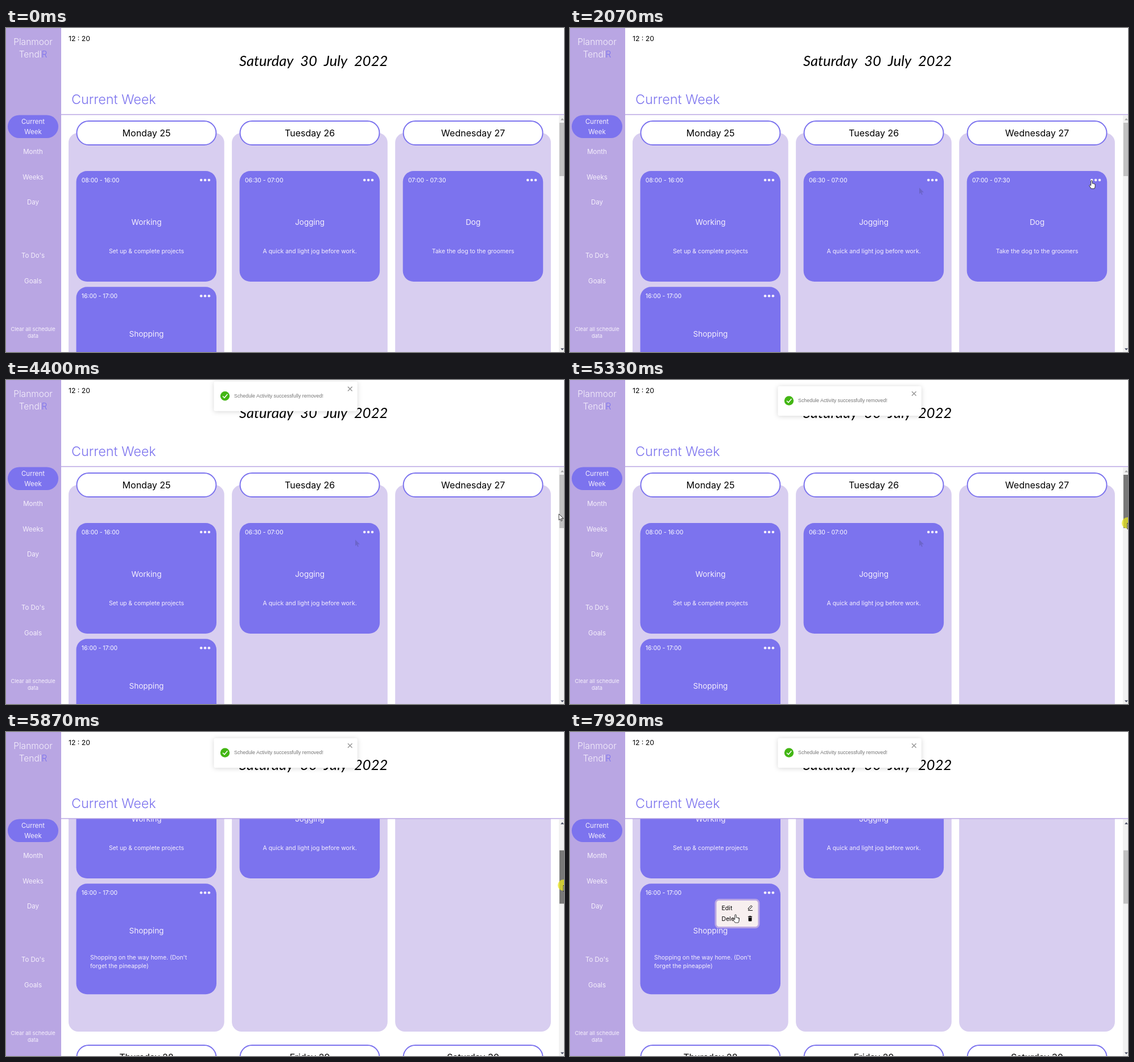
Write an HTML page that moves like this. It is 981x571 px and loops after 7.99 s.

```html
<!DOCTYPE html>
<html lang="en">
<head>
<meta charset="utf-8">
<title>Week schedule</title>
<style>
  html, body { margin: 0; width: 100%; height: 100%; overflow: hidden; background: #fff; }
  svg { display: block; width: 981px; height: 571px; font-family: Inter, "Open Sans", sans-serif; }
  .box { filter: drop-shadow(0 1px 4px rgba(0, 0, 0, .16)); }
</style>
</head>
<body>
<svg id="stage" viewBox="0 0 981 571"></svg>
<script>
const LOOP = 7990, STEP = 66.6;
const VIOLET = '#7c73ee', LILAC = '#b9a6e3', PALE = '#d8cef0', SOFT = '#f6f0fc';
const LEFT = 'text-anchor="start"', MID = 'text-anchor="middle"', LIGHT = ' font-weight="300"';

const text = (x, y, s, size, fill = SOFT, more = MID) =>
  `<text x="${x}" y="${y + size * .36}" font-size="${size}" fill="${fill}" ${more}>${s}</text>`;
const rect = (x, y, w, h, r, fill, more = '') =>
  `<rect x="${x}" y="${y}" width="${w}" height="${h}" rx="${r}" fill="${fill}" ${more}/>`;
const colX = i => 110 + 287.1 * i;
const cardX = i => colX(i) + 13.5;

const week = (y, names) => names.map((name, i) =>
  rect(colX(i), y + 22, 273.7, 532, 17, PALE) +
  rect(colX(i) + 14.4, y + 1, 245, 42, 21, '#fff', `stroke="${VIOLET}" stroke-width="2"`) +
  text(colX(i) + 137, y + 22, name, 16, '#000')).join('');

function card(col, y, hours, title, titleY, note, id) {
  const x = cardX(col);
  const dots = [0, 1, 2].map(i => `<circle cx="${x + 219.6 + 6.9 * i}" cy="${y + 16}" r="2.3" fill="${SOFT}"/>`).join('');
  return `<g id="${id}">` + rect(x, y, 246.5, 195, 19, VIOLET) + dots +
    text(x + 9.3, y + 16, hours, 10.4, '#fff', LEFT) +
    text(x + 123.5, y + titleY, title, 13.5) + note + '</g>';
}
const note = (col, s) => text(colX(col) + 137, 393, s, 10.4);

const links = (y, names) => names.map((s, i) => text(47.5, y + 44.6 * i, s, 11.5)).join('');
const sidebar = rect(0, 0, 97, 571, 0, LILAC) + rect(3, 153.5, 89, 40.5, 20.2, VIOLET) +
  text(47.5, 24, 'Planmoor', 15.5, SOFT, MID + LIGHT) +
  text(47.5, 46.5, `Tendl<tspan fill="${VIOLET}">R</tspan>`, 15.5, SOFT, MID + LIGHT) +
  text(47.5, 165, 'Current', 11.5) + text(47.5, 182.5, 'Week', 11.5) +
  links(218, ['Month', 'Weeks', 'Day']) + links(401.3, ["To Do's", 'Goals']) +
  text(47.5, 530.5, 'Clear all schedule', 9.3) + text(47.5, 543, 'data', 9.3);

const header = text(110, 18.5, '12 : 20', 12.2, '#000', LEFT) +
  text(410, 58, 'Saturday 30 July 2022', 25.5, '#000',
    LEFT + ' font-family="Lato, sans-serif" font-style="italic" word-spacing="6.5"') +
  text(115, 125.5, 'Current Week', 23.3, VIOLET, LEFT + LIGHT);

const menu = `<g id="menu">` +
  rect(1.5, 1.5, 76, 49, 6, '#f7efef', `stroke="${LILAC}" stroke-width="3"`) +
  text(12, 16, 'Edit', 10.6, '#000', LEFT) + text(12, 35, 'Delete', 10.6, '#000', LEFT) +
  `<path d="M58.5 20.5H66.5M59 18.5V16.5L64 11.8 65.8 13.6 61 18.5Z" fill="none" stroke="#000"/>
   <path d="M58.6 31.5H65.6M60.8 30.7H63.4" stroke="#000" stroke-width="1.3"/>
   <path d="M59.2 33H65V38.4Q65 39.5 64 39.5H60.2Q59.2 39.5 59.2 38.4Z"/></g>`;

const board = `<clipPath id="view"><rect x="97" y="153" width="884" height="418"/></clipPath>
  <g clip-path="url(#view)"><g id="board">` +
  week(163, ['Monday 25', 'Tuesday 26', 'Wednesday 27']) +
  week(740, ['Thursday 28', 'Friday 29', 'Saturday 30']) +
  card(0, 252, '08:00 - 16:00', 'Working', 90, note(0, 'Set up &amp; complete projects'), 'work') +
  card(1, 252, '06:30 - 07:00', 'Jogging', 90, note(1, 'A quick and light jog before work.'), 'jog') +
  card(2, 252, '07:00 - 07:30', 'Dog', 90, note(2, 'Take the dog to the groomers'), 'dog') +
  card(0, 456.3, '16:00 - 17:00', 'Shopping', 83,
    text(148, 586, "Shopping on the way home. (Don't", 10.4, SOFT, LEFT) +
    text(148, 601, 'forget the pineapple)', 10.4, SOFT, LEFT), 'shop') +
  menu + '</g></g>' + rect(97, 151.8, 884, 1.5, 0, LILAC);

const scrollbar = rect(972, 154, 9, 417, 0, '#f1f1f1') + rect(973, 167, 8, 94, 0, '#c1c1c1', 'id="thumb"') +
  '<path id="up" d="M975 162.5L978 159 981 162.5Z"/><path d="M975 564.5L978 568 981 564.5Z" fill="#454a60"/>';

const toast = `<g id="toast"><g class="box">${rect(365.5, 11, 252.3, 52, 3, '#fff')}</g>
  <circle cx="385" cy="36.5" r="8.2" fill="#43b614"/>
  <path d="M381 36.8L384 39.6 389.4 33.2" fill="none" stroke="#fff" stroke-width="1.5"/>
  <path d="M601 20.2L608.6 27.8M608.6 20.2L601 27.8" stroke="#999" stroke-width="1.5"/>` +
  text(401, 36.2, 'Schedule Activity successfully removed!', 8.9, '#757575',
    LEFT + ' font-family="Liberation Sans, Arial, sans-serif"') + '</g>';

const ARROW = 'M0 0V11L2.5 8.7 4.2 12.5 5.9 11.7 4.2 8.1H8Z';
const HAND = 'M-1.2 8.5V1a1.2 1.2 0 0 1 2.4 0V5q1.2-.6 1.7.3 1.2-.5 1.7.5 1.6-.3 1.6 1.2V10q0 2-1.2 4H-.8Q-2.5 11.5-4.2 8.6-3.6 6.8-1.2 8.5Z';

document.getElementById('stage').innerHTML = header + board + scrollbar + sidebar + toast +
  `<path id="ghost" d="${ARROW}" transform="translate(614 281.5)" fill="#4a4680" opacity=".32"/>
   <g id="cursor"><circle id="press" r="10" fill="#e8e41e" opacity=".75"/>
   <path id="pointer" fill="#fff" stroke="#222" stroke-width=".9" stroke-linejoin="round"/></g>`;

const set = (id, name, value) => document.getElementById(id).setAttribute(name, value);
const show = (id, on) => set(id, 'display', on ? 'inline' : 'none');
const move = (id, x, y) => set(id, 'transform', `translate(${x} ${y})`);
const within = (t, ...spans) => spans.some(([a, b]) => t >= a && t < b);
const progress = (t, a, b) => Math.min(1, Math.max(0, (t - a) / (b - a)));
const smooth = p => (1 - Math.cos(Math.PI * p)) / 2;

// pointer moves: start, end, x, y reached
const MOVES = [
  [460, 590, 610, 320], [850, 1050, 565, 220], [1050, 1260, 686, 279], [1440, 2050, 917, 269],
  [2470, 3180, 864, 312], [4240, 4390, 972, 236], [4440, 4600, 980, 252], [5590, 5860, 980, 270],
  [6220, 6330, 388, 314], [6640, 6990, 357, 284], [7380, 7900, 291, 322]
];

function pointerAt(t) {
  let x = 816, y = 507;
  for (const [a, b, toX, toY] of MOVES) {
    const p = smooth(progress(t, a, b));
    x += (toX - x) * p;
    y += (toY - y) * p;
  }
  return [x, y];
}

// damped swing after the drop from above
function bounce(p) {
  const swing = Math.max(0, (p - .6) / .15);
  return p < 1 ? 20 * Math.cos(Math.PI * swing) * .4 ** swing : 0;
}

function draw(t) {
  const tick = Math.floor((t + 14) / STEP) * STEP;
  const offset = 189 * (1 - (1 - progress(tick, 5488, 5860)) ** 2);
  move('board', 0, -offset);
  set('thumb', 'y', 167 + offset / 4.55);
  set('thumb', 'fill', within(t, [5330, 6000]) ? '#787878' : within(t, [4880, 6260]) ? '#a8a8a8' : '#c1c1c1');
  set('up', 'fill', offset ? '#454a60' : '#a3a3a3');

  show('dog', t < 3940);
  show('menu', within(t, [2470, 3940], [7400, LOOP]));
  move('menu', cardX(t < 5000 ? 2 : 0) + 131, t < 5000 ? 279 : 483);

  show('toast', t >= 4270);
  move('toast', 0, bounce((tick - 3877) / 700));

  show('ghost', within(t, [1260, 5670]));
  show('cursor', t >= 460);
  show('press', within(t, [2270, 2470], [3670, 3940], [5330, 6000], [7190, 7400]));
  move('cursor', ...pointerAt(tick + 14));
  set('pointer', 'd', within(t, [2000, 2540], [3280, 3940], [6930, 7470], [7780, LOOP]) ? HAND : ARROW);
}

const start = performance.now();
function frame() {
  draw((performance.now() - start) % LOOP);
  requestAnimationFrame(frame);
}
frame();
</script>
</body>
</html>
```
